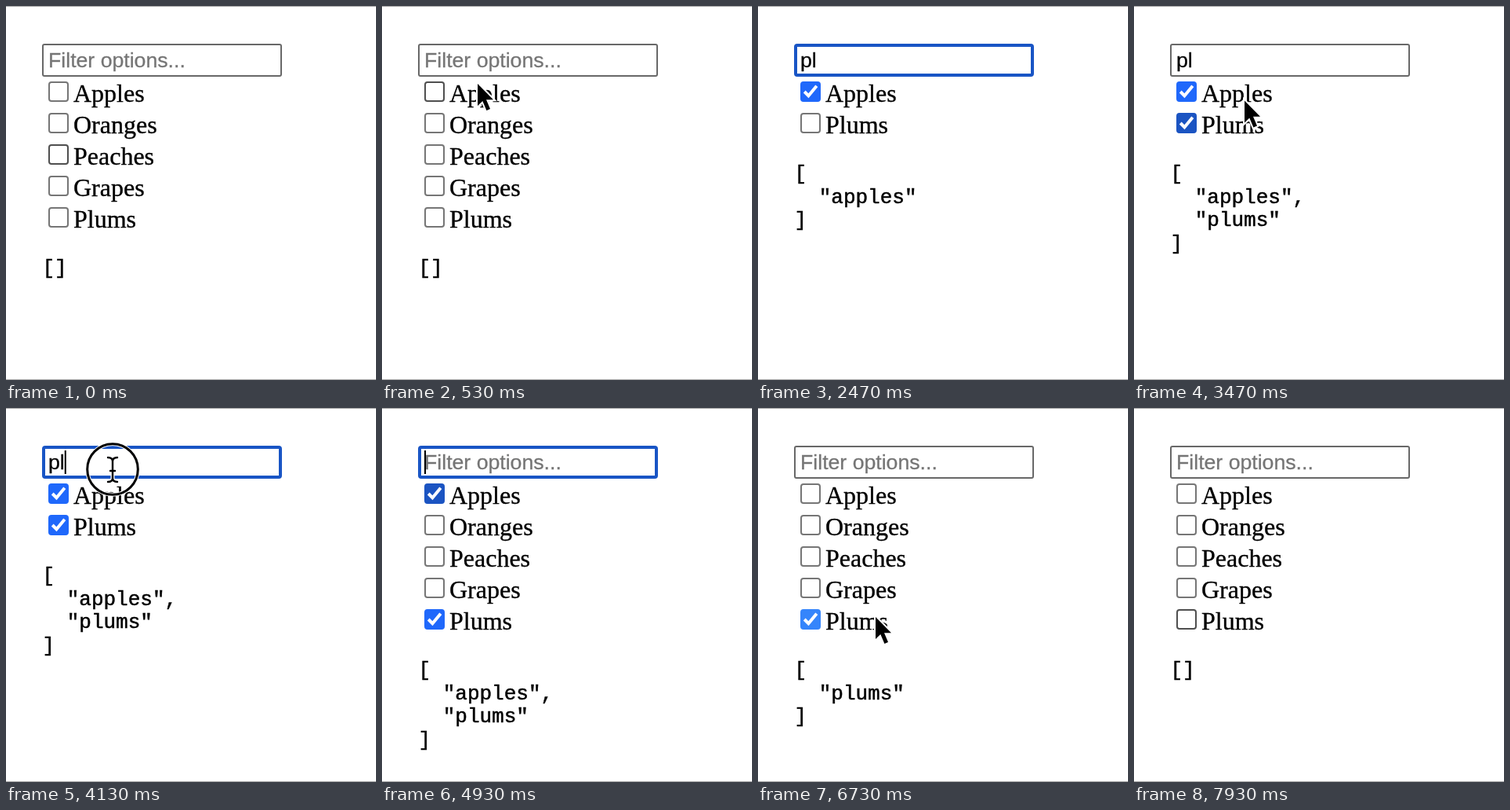
An HTML page that plays this animation: 472 px wide and 476 px high, repeating every 7.99 s.

```html
<!DOCTYPE html>
<html lang="en">
<head>
<meta charset="utf-8">
<title>Filterable checkbox list</title>
<style>
  html, body { margin: 0; width: 100%; height: 100%; overflow: hidden; background: #fff; }
  svg { display: block; width: 100%; height: 100%; }
  text { white-space: pre; }
  .label { font: 32px "Liberation Serif", "Times New Roman", serif; stroke: #000; stroke-width: .35; }
  .field { font: 26.667px "Liberation Sans", Arial, sans-serif; stroke: currentColor; stroke-width: .3; fill: currentColor; }
  .json { font: 26px "Liberation Mono", "Courier New", monospace; stroke: #000; stroke-width: .5; }
</style>
</head>
<body>
<svg viewBox="0 0 472 476" xmlns="http://www.w3.org/2000/svg">
  <rect width="472" height="476" fill="#fff"/>
  <path d="M0 .5H472M0 475.5H472" stroke="#a9a9a9"/>
  <rect id="box" fill="#fff" rx="2"/>
  <text id="query" class="field" x="54" y="78"></text>
  <rect id="caret" y="54" width="2" height="30"/>
  <g id="options"></g>
  <g id="output"></g>
  <g id="pointer">
    <path id="arrow" d="M0 1V29L6.3 23 11.4 35 16 33 11 21.3H20Z"
      stroke="#fff" stroke-width="4" paint-order="stroke"/>
    <g id="beam" fill="none" stroke-linecap="round">
      <path id="beamShape" d="M-6-15Q0-15 0-10Q0-15 6-15M0-10V11M-6 16Q0 16 0 11Q0 16 6 16M-3 2H3"/>
    </g>
    <g id="ring" fill="none">
      <circle r="32.3" stroke="#fff" stroke-width="5"/>
      <circle r="32.3" stroke="#000" stroke-width="3"/>
    </g>
  </g>
</svg>
<script>
const LOOP = 7990, FPS = 15, BLINK = 500, HOVER_LAG = 133, PRESS = 130, FADE_OUT = 7130;
const ROW = 40, LINE = 29.6;
const NAMES = ["Apples", "Oranges", "Peaches", "Grapes", "Plums"];
const GRAY = "#767676", FIELD_GRAY = "#686868", DARK = "#4f4f4f", FOCUS = "#1955c5";
const BLUE = "#1f68fb", BLUE_HOVER = "#1b54c2", BLUE_ACTIVE = "#3585fb";

// The story: where the pointer goes, what it clicks, what is typed
const ENTRY = { x: 416, y: 190 };
const MOVES = [
  { from: 130, to: 470, x: 122, y: 98, click: 600, on: "Apples" },
  { from: 870, to: 1070, x: 185, y: 72, click: 1230, on: "field" },
  { from: 2530, to: 3070, x: 146, y: 161, click: 3270, on: "Plums" },
  { from: 3280, to: 3930, x: 136, y: 78, click: 4130, on: "field" },
  { from: 4200, to: 4330, x: 136, y: 114 },
  { from: 5600, to: 5870, x: 108, y: 119, click: 6130, on: "Apples" },
  { from: 6200, to: 6600, x: 150, y: 265, click: 6800, on: "Plums" }
];
const KEYS = [
  { at: 1870, text: "p" }, { at: 1960, text: "pl" },
  { at: 4870, text: "p" }, { at: 4900, text: "" }
];
const CLICKS = MOVES.filter(move => move.click).map(({ click, on }) =>
  ({ on, up: click, down: on === "field" ? click : click - PRESS }));

const $ = id => document.getElementById(id);
const set = (el, attrs) => {
  for (const name in attrs) el.setAttribute(name, attrs[name]);
  return el;
};
const add = (parent, tag, attrs) =>
  parent.appendChild(set(document.createElementNS("http://www.w3.org/2000/svg", tag), attrs));
const show = (el, on) => set(el, { display: on ? "inline" : "none" });
const setText = (el, text) => { if (el.textContent !== text) el.textContent = text; };
const latest = (list, key, t) => list.filter(item => item[key] <= t).pop();

for (const [stroke, width] of [["#fff", 5], ["#000", 2.4]])
  add($("beam"), "path", { d: $("beamShape").getAttribute("d"), stroke, "stroke-width": width });
$("beamShape").remove();

const rows = NAMES.map(name => {
  const g = add($("options"), "g", {});
  const box = add(g, "rect", { x: 55, y: 97, width: 24, height: 24, rx: 3, "stroke-width": 2 });
  const tick = add(g, "path", {
    d: "M59.2 109l5.2 5.2L74.8 101.8", fill: "none", stroke: "#fff", "stroke-width": 4
  });
  add(g, "text", { class: "label", x: 86, y: 122 }).textContent = name;
  return { name, g, box, tick };
});
const lines = NAMES.map(() => add($("output"), "text", { class: "json", x: 46.5 }));

function pointerAt(t) {
  let { x, y } = ENTRY;
  for (const move of MOVES) {
    const u = Math.min(1, Math.max(0, (t - move.from) / (move.to - move.from)));
    const eased = u * (2 - u);
    x += (move.x - x) * eased;
    y += (move.y - y) * eased;
  }
  return { x, y };
}

const inField = ({ x, y }) => x > 46 && x < 352 && y > 48 && y < 90;
const isChecked = (name, t) => CLICKS.filter(c => c.on === name && c.up <= t).length % 2 === 1;

function drawField(t, query, hovered) {
  const click = latest(CLICKS, "down", t);
  const focused = click?.on === "field";
  const inset = focused ? 2 : 1;
  set($("box"), {
    x: 46 + inset, y: 48 + inset, width: 306 - 2 * inset, height: 42 - 2 * inset,
    stroke: focused ? FOCUS : hovered ? DARK : FIELD_GRAY, "stroke-width": 2 * inset
  });
  setText($("query"), query || "Filter options...");
  set($("query"), { color: query ? "#000" : "#757575" });
  const typed = query ? $("query").getComputedTextLength() : 0;
  const lastInput = Math.max(click?.down ?? 0, latest(KEYS, "at", t)?.at ?? 0);
  set($("caret"), { x: 54 + typed });
  show($("caret"), focused && (t - lastInput) % (2 * BLINK) < BLINK);
}

function drawOptions(t, query, hoverRow) {
  const pressed = CLICKS.some(c => t >= c.down && t < c.up);
  let count = 0;
  for (const { name, g, box, tick } of rows) {
    const matches = name.toLowerCase().includes(query);
    show(g, matches);
    if (!matches) continue;
    const checked = isChecked(name, t), hovered = count === hoverRow;
    const blue = !hovered ? BLUE : pressed ? BLUE_ACTIVE : BLUE_HOVER;
    set(g, { transform: `translate(0 ${ROW * count++})` });
    set(box, {
      fill: checked ? blue : "#fff",
      stroke: checked ? blue : hovered ? DARK : GRAY
    });
    show(tick, checked);
  }
  return count;
}

function drawOutput(t, count) {
  const picked = NAMES.filter(name => isChecked(name, t)).map(name => name.toLowerCase());
  const json = JSON.stringify(picked, null, 2).split("\n");
  lines.forEach((line, i) => {
    setText(line, json[i] || "");
    set(line, { y: 141 + ROW * count + LINE * i });
  });
}

function drawPointer(t) {
  const at = pointerAt(t), beam = inField(at);
  const moved = latest(MOVES, "from", t)?.from ?? -1;
  const typed = latest(KEYS, "at", t)?.at ?? 0;
  show($("pointer"), moved > typed);
  set($("pointer"), {
    transform: `translate(${at.x} ${at.y})`,
    opacity: Math.min(1, Math.max(0, 1 - (t - FADE_OUT) / 200))
  });
  show($("arrow"), !beam);
  show($("beam"), beam);
  show($("ring"), CLICKS.some(({ down, up }) => {
    const start = (down + up) / 2;
    return t >= start && t < start + PRESS;
  }));
}

function render(time) {
  const step = Math.floor((time % LOOP + 5) * FPS / 1000);
  const t = Math.round(step * 100 / FPS) * 10;
  const query = latest(KEYS, "at", t)?.text ?? "";
  const hover = pointerAt(t - HOVER_LAG);
  drawField(t, query, inField(hover));
  drawOutput(t, drawOptions(t, query, Math.floor((hover.y - 92) / ROW)));
  drawPointer(t);
}

const start = performance.now();
function tick() {
  render(performance.now() - start);
  requestAnimationFrame(tick);
}
tick();
</script>
</body>
</html>
```
